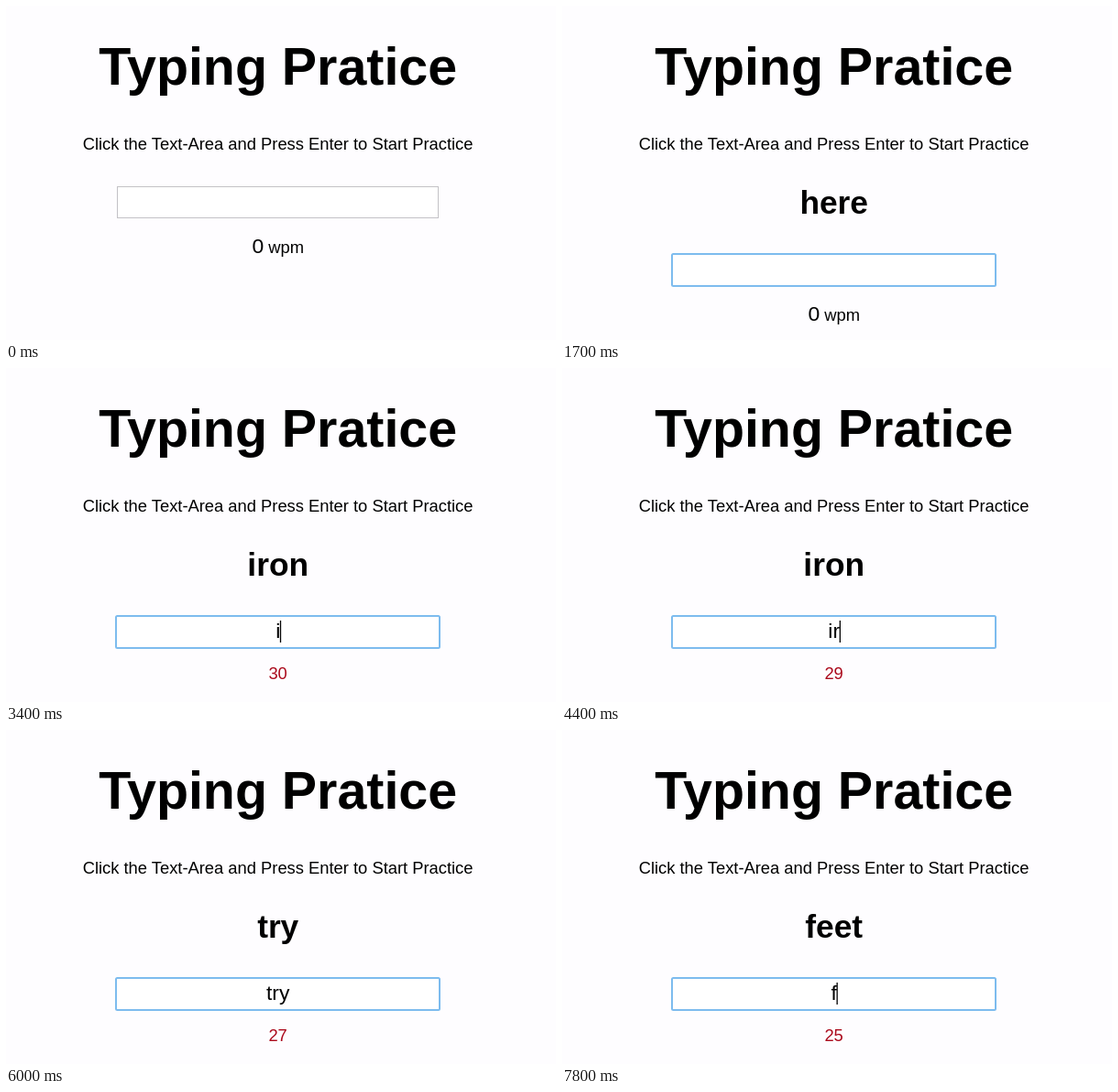
An HTML page for the animation above (8000 ms loop, 600x365 px).

```html
<!DOCTYPE html>
<html lang="en">
<head>
<meta charset="utf-8">
<title>Typing practice</title>
<style>
  html, body { margin: 0; width: 100%; height: 100%; overflow: hidden; background: #fefdff; }
  svg { display: block; }
  text { font: 18.35px "Liberation Sans", Arial, Helvetica, sans-serif; text-anchor: middle; }
  #title { font-size: 57.35px; font-weight: bold; }
  #word { font-size: 35.3px; font-weight: bold; }
  #typed, .score { font-size: 22.9px; }
  #timer { fill: #ab0a1c; }
  #idle { fill: #fff; stroke: #c3c2c6; }
  #focus { fill: #fff; stroke: #7dbcee; stroke-width: 2; }
  #pointer path { fill: none; stroke-linecap: round; }
</style>
</head>
<body>
<svg width="600" height="365" viewBox="0 0 600 365">
  <text id="title" x="296.7" y="86">Typing Pratice</text>
  <text x="296.6" y="157">Click the Text-Area and Press Enter to Start Practice</text>
  <text id="word" x="296.7" y="226.5"></text>
  <g id="field">
    <rect id="idle" x="121.5" y="197.5" width="350" height="34"/>
    <rect id="focus" x="120" y="197" width="353" height="35" rx="1.5"/>
    <text id="typed" x="296.7" y="220.5"></text>
    <rect id="caret" y="202" width="1.3" height="24"/>
    <text id="wpm" x="296.7" y="270"><tspan class="score">0</tspan> wpm</text>
  </g>
  <text id="timer" x="296.6" y="340"></text>
  <g id="pointer">
    <path id="beam" d="M-4-9Q-.5-9 0-6Q.5-9 4-9M0-6V6M-4 9Q-.5 9 0 6Q.5 9 4 9M-2 2H2" stroke="#fff" stroke-width="3"/>
    <path d="M-4-9Q-.5-9 0-6Q.5-9 4-9M0-6V6M-4 9Q-.5 9 0 6Q.5 9 4 9M-2 2H2" stroke="#111" stroke-width="1.3"/>
  </g>
</svg>
<script>
  const LOOP = 8000, STEP = 100;
  const FOCUS = 800, START = 1600, COUNTDOWN = 2500;
  const CENTER = 296.7, DROP = 74;
  const $ = id => document.getElementById(id);

  // Each track lists [start time, value].
  const words = [[0, ""], [START, "here"], [2800, "iron"], [4900, "try"], [6100, "have"], [7200, "feet"]];
  const typing = [
    [0, ""], [2300, "h"], [2400, "he"], [2500, "her"], [2600, "here"],
    [2800, ""], [3000, "i"], [3100, "ir"], [3400, "i"], [3700, "ir"], [3800, "irn"], [3900, "irno"],
    [4200, "irn"], [4300, "ir"], [4600, "iro"], [4700, "iron"],
    [4900, ""], [5400, "t"], [5500, "tr"], [5600, "try"],
    [6100, ""], [6500, "h"], [6600, "ha"], [7000, "hav"], [7100, "have"],
    [7200, ""], [7700, "f"]
  ];
  const caretShown = [[0, false], [FOCUS, true], [1400, false], [2000, true], [6000, false], [6100, true]];

  const at = (track, t) => track.findLast(([start]) => start <= t)[1];
  const show = (id, on) => $(id).setAttribute("visibility", on ? "visible" : "hidden");

  function movePointer(t) {
    const p = Math.min(1, Math.max(0, (t - 100) / 600));
    const e = p * p * (3 - 2 * p);
    $("pointer").setAttribute("transform", `translate(${262 - 24 * e} ${91 + 130 * e})`);
    show("pointer", t >= 100 && t < START);
  }

  function draw(t) {
    const focused = t >= FOCUS, counting = t >= COUNTDOWN;
    $("word").textContent = at(words, t);
    $("typed").textContent = at(typing, t);
    $("timer").textContent = counting ? 30 - Math.floor((t - COUNTDOWN) / 1000) : "";
    $("field").setAttribute("transform", `translate(0 ${t >= START ? DROP : 0})`);
    show("idle", !focused);
    show("focus", focused);
    show("wpm", !counting);
    show("caret", at(caretShown, t));
    const width = $("typed").textContent ? $("typed").getComputedTextLength() : 0;
    $("caret").setAttribute("x", CENTER + width / 2 - 0.4);
    movePointer(t);
  }

  const origin = performance.now();
  let last = -1;
  function tick() {
    const t = Math.floor((performance.now() - origin) % LOOP / STEP) * STEP;
    if (t !== last) draw(last = t);
    requestAnimationFrame(tick);
  }
  tick();
</script>
</body>
</html>
```
